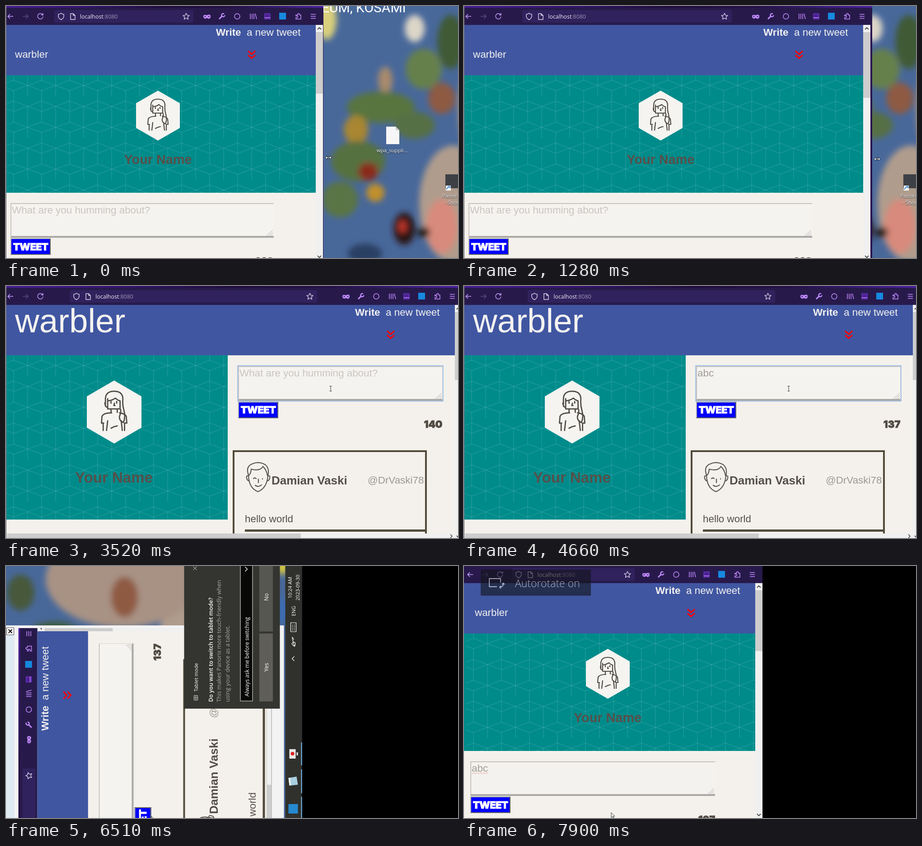
An HTML page that plays this animation: 1001 px wide and 560 px high, repeating every 8 s.

```html
<!DOCTYPE html>
<html lang="en">
<head>
<meta charset="utf-8">
<title>Window resize and autorotate</title>
<style>
html, body { margin: 0; width: 100%; height: 100%; overflow: hidden; background: #000; }
#stage { position: relative; width: 1001px; height: 560px; overflow: hidden; background: #000;
  font: 22.4px/0 "Liberation Sans", Arial, sans-serif; white-space: nowrap; color: #544e47; }
#stage div, #stage span, #stage svg, #stage i { position: absolute; }
#stage b { font-weight: 700; }
#view { inset: 0; overflow: hidden; }
#screen { left: 0; top: 0; width: 1001px; height: 560px; transform-origin: 0 0; }
svg { left: 0; top: 0; overflow: visible; }
.ui { font-family: "Open Sans", "Noto Sans", sans-serif; }
.heavy { font: 900 22px/0 Inter, sans-serif; -webkit-text-stroke: .8px; }

/* browser window */
#win { left: 0; top: 0; width: calc(var(--t) * 1px + 17px); max-width: 1005px; height: 564px; background: #2a1550; clip-path: inset(-36px 0 0 -6px); }
#strip { left: -5px; top: -36px; right: 0; height: 40px; background: linear-gradient(90deg, #471d93, #351370 24%, #1e0c3c 50%, #251048 72%, #4b229f); }
#bar { left: 0; top: 4px; right: 0; height: 38px; background: #271a4b; box-shadow: -5px 0 #271a4b; }
#url { left: calc(var(--t) * .112px + 30px); top: 5px; width: calc(var(--t) * .778px - 226px); height: 28px; border-radius: 4px; background: #30225c; }
#address { left: 57px; top: 14.5px; font-size: 12.4px; color: #f1edfa; }
#stage #address span { position: static; color: #9c93b4; }
#star { left: auto; right: 8px; top: 6px; }
#tools { left: calc(var(--t) * 1px - 256px); }
#page { left: 0; top: 42px; width: calc(var(--w) * 1px); height: 522px; background: #f4f1ec; box-shadow: -5px 0 #f4f1ec; }
#head { left: 0; top: 0; width: 100%; height: 112px; background: #4056a1; box-shadow: -5px 0 #4056a1; color: #f4f2f0; }
#logo { left: 20px; top: 66.2px; }
#write { left: calc(100% - 221px); top: 17.2px; white-space: pre; }
#chev { left: calc(100% - 150px); top: 56px; }
#hero { left: 0; top: 112px; width: 100%; height: 261px; background: #008b8b; box-shadow: -5px 0 #008b8b; }
#hex { left: calc(50% - 55px); top: 34px; width: 97px; height: 111px; }
#you { left: 0; width: calc(100% - 13px); top: 187px; text-align: center; font-weight: 700; font-size: 28.8px; color: #57504a; }
#form { left: 9.5px; top: 395.5px; width: calc(var(--w) * .9px - 34px); height: 77px; }
#area { inset: 0; box-sizing: border-box; border: solid #c6c3bf; border-width: 2px 0 4px 2px; border-bottom-color: #aaa8a5; background: #f5f3f0; }
#hint, #typed { left: 3.5px; top: 16.2px; color: #c9c5c1; }
#typed { color: #a19d99; }
#stage #word { position: static; }
.spell #word { text-decoration: underline wavy #f08d88 1px; }
#caret { top: -13px; width: 1px; height: 26px; background: #222; }
#grip { left: auto; top: auto; right: 2px; bottom: 4px; }
#send { left: .5px; top: 78.5px; width: 89px; height: 37px; box-sizing: border-box; border: 2px solid #777; border-color: #aaa #666 #666 #aaa; background: #00f; color: #fff; }
#send span { left: 0; right: 0; top: 16.5px; text-align: center; letter-spacing: -.6px; }
.press #send { border-color: #445 #00f #00f #445; }
#count { right: 0; top: 129px; color: #504a42; }
#card { display: none; left: 502px; top: 323px; width: 430px; height: 190px; box-sizing: border-box; border: 5px solid #524a3b; border-width: 4px 4px 5px; }
#hbar { display: none; left: 0; top: 508px; width: 100%; height: 14px; background: #f0f0f0; }
#hbar i { left: 2px; top: 0; width: 651px; height: 10px; background: #cdcdcd; }
#hbar svg { left: auto; right: 5px; top: 2px; }
#vbar { left: calc(var(--w) * 1px); top: 42px; width: 16px; height: 522px; background: #f0f0f0; }
#vbar i { left: 0; top: 16px; width: 16px; height: calc(var(--w) * .045px + 106px); background: #cdcdcd; }
#edge { left: 0; top: 0; width: 1px; height: 560px; background: #77737c; }

.wide #logo { font-size: 74.5px; top: 36.2px; }
.wide #hero { width: 491px; height: 365px; }
.wide #hex { left: calc(50% - 67px); top: 56px; width: 121px; height: 140px; }
.wide #you { font-size: 33px; top: 271.6px; }
.wide #form { left: 513.5px; top: 136px; width: calc(var(--w) * 1px - 541px); }
.wide #area { border-right: 1px solid #d8d5d1; }
.wide #card, .wide #hbar { display: block; }
.focus #area { box-shadow: 0 0 0 2px #a8c6ea; }
.spell #area { background: #f8f7f5; }
.portrait #area { background: #f4f2ee; }
.portrait #win { transform: translate(4px, -4px); }
.portrait #edge { display: none; }
.portrait #view { width: 661px; right: auto; }

/* capture frame around the stage */
#frame { left: 0; top: 0; }
#frame div { background: #f3f3f4; }
#popup { left: 33px; top: 15px; width: 244px; height: 58px; background: #131418; color: #f3f3f3; }
#popup span { left: 76px; top: 30px; font-size: 23px; font-weight: 300; }
.portrait #popup { left: 37px; top: 8px; }
</style>
</head>
<body>
<div id="stage">
  <div id="view"><div id="screen">
    <svg id="desk" width="1001" height="560">
      <defs>
        <clipPath id="deskClip"><path d="M-40-41H1176V628H-40z"/></clipPath>
        <filter id="soft" x="-10%" y="-10%" width="120%" height="120%"><feGaussianBlur stdDeviation="7"/></filter>
      </defs>
      <g clip-path="url(#deskClip)">
        <path fill="#48689a" d="M-40-41H1176V628H-40z"/>
        <g id="blobs" filter="url(#soft)"></g>
      </g>
      <text x="699" y="14" font-size="30" font-family="Roboto, sans-serif" fill="#fff">EUM, KOSAMI</text>
      <path d="M842 268h21l8 8v31h-29z" fill="#f6f6f6"/><path d="M863 268v8h8z" fill="#c9c9c9"/>
      <path d="M973 374h34v31h-34z" fill="#3d4145"/>
      <path d="M974 399h11v11h-11z" fill="#fff"/><path d="M976 408q0-5 5-5m-2-2h4v4" fill="none" stroke="#1d6fc0" stroke-width="1.6"/>
      <g class="ui" font-size="11.4" fill="#fff" style="text-shadow:0 1px 2px #000">
        <text x="855" y="325" text-anchor="middle">wpa_suppli...</text>
        <text x="966" y="426">Panorix</text><text x="971" y="441">- Shortcut</text>
      </g>
    </svg>

    <div id="win">
      <div id="strip"></div>
      <div id="bar">
        <svg width="90" height="38" fill="none" stroke="#c39cff" stroke-width="1.5">
          <path d="M16 19H4m5-5-5 5 5 5"/>
          <path d="M37 19h12m-5-5 5 5-5 5" stroke="#5d4a85"/>
          <path d="M81 15.500a6 6 0 1 0 1 4M82 12v4h-4"/>
        </svg>
        <div id="url">
          <svg width="50" height="28" fill="none" stroke="#ded6f0" stroke-width="1.4">
            <path d="M15 7q3 2.500 6 2.500v4q0 5-6 8-6-3-6-8v-4q3 0 6-2.500z"/><path d="M36 8h6l4 4v9H36zm6 0v4h4"/>
          </svg>
          <span id="address" class="ui">localhost<span>:8080</span></span>
          <svg id="star" width="16" height="16" fill="none" stroke="#ded6f0" stroke-width="1.300" stroke-linejoin="round"><path d="m8 1 2.100 4.600 5 .5-3.800 3.400 1.100 5L8 12l-4.400 2.500 1.100-5L.9 6.100l5-.5z"/></svg>
        </div>
        <svg id="tools" width="260" height="38" fill="none" stroke="#c48bff" stroke-width="1.500">
          <path d="M15 16.500q8-3.500 8 2.500t-5 5q-2 0-3-2-1 2-3 2-5 0-5-5t8-2.500z" fill="#c48bff" stroke="none"/>
          <path d="M9.500 19.500h3m5 0h3" stroke="#271a4b" stroke-width="2"/>
          <path d="m42 25 7-7" stroke-width="3"/><path d="M53 13.500a3.500 3.500 0 1 0 1.500 3" stroke-width="2.400"/>
          <circle cx="82" cy="19" r="6"/>
          <path d="M111 13v12m4-12v12m4-12v12m3-12 3 12"/>
          <path d="M143 13h12v12h-12z" fill="#4b2291" stroke="#6b33c0"/><path d="M143 22h12"/>
          <path d="M175 11h15v15h-15z" fill="#1689e0" stroke="none"/>
          <path d="M212 16h4v-1.500a2 2 0 0 1 4 0V16h3v9h-11v-3h2a2 2 0 0 0 0-4h-2z"/>
          <path d="M245 14.500h11m-11 4.500h11m-11 4.500h11"/>
        </svg>
      </div>
      <div id="page">
        <div id="head">
          <span id="logo">warbler</span>
          <span id="write"><b>Write</b>  a new tweet</span>
          <svg id="chev" width="16" height="20" fill="none" stroke="#f00" stroke-width="3"><path d="m0 2 8 7 8-7M0 11l8 7 8-7"/></svg>
        </div>
        <div id="hero">
          <svg width="100%" height="100%" style="overflow:hidden">
            <pattern id="cubes" width="62" height="93" x="-14" y="-12" patternUnits="userSpaceOnUse">
              <path fill="none" stroke="#fff" stroke-opacity=".17" d="M0 34.500 31 46l31-11.500M0 34.500 31 23l31 11.500M0 81l31-11.500L62 81M0-12l31 11.500L62-12M0 81l31 11.500L62 81M31 46v47M31 0v23M0 0v58m0 23v12M62 0v58m0 23v12"/>
            </pattern>
            <rect width="100%" height="100%" fill="url(#cubes)"/>
          </svg>
          <svg id="hex" viewBox="0 0 97 111" preserveAspectRatio="none">
            <path fill="#f5f4f1" d="M48.500 0 97 28v55l-48.500 28L0 83V28z"/>
            <g fill="none" stroke="#4f4a43" stroke-width="2.200" stroke-linejoin="round" stroke-linecap="round">
              <path d="M36 47q-4-1-3-5V33q0-14 15.500-14T64 33q-1 10 2 20 3 12-1 21-8-3-7-11 3-6 2-12M37 32v18h22V36q-6-2-8-5-6 4-14 5M43 51v5m11-5v5M33 38q-2 2 0 5"/>
              <path d="M43 37v3m10-3v3m-4 0-1 4h2M44 57q-14 0-17 6l-1 12h4m-1 0v13m8-17-2 17M58 57q9 1 12 6l1 12h-4m0 0v13m-6-17 2 17M43 84q5-3 11-4"/>
            </g>
          </svg>
          <div id="you">Your Name</div>
        </div>
        <div id="form">
          <div id="area"></div>
          <span id="hint">What are you humming about?</span>
          <span id="typed"><span id="word"></span><i id="caret"></i></span>
          <svg id="grip" width="14" height="14" fill="none" stroke="#aaa"><path d="M0 14 14 1M5 14l9-8M10 14l4-3.500"/></svg>
          <div id="send"><span class="heavy">TWEET</span></div>
          <span id="count" class="heavy"></span>
        </div>
        <div id="card">
          <svg width="54" height="67" style="left:25px;top:22px" fill="none" stroke="#5a5650" stroke-width="2.200" stroke-linecap="round">
            <path d="M6 29Q-1 10 15 4q14-6 28 2 10 8 6 25M6 28q0 30 21 38 20-8 22-36M8 29q4-7 4-13 20 5 26-6 8 8 10 20M6 31q-6-1-4 5 1 6 6 6m41-11q6-1 4 5-1 6-6 6M17 37q3-3 6 0m14 0v1m-9 0v8m-7 6q7 5 14-1"/>
          </svg>
          <span style="left:82px;top:63px;font-size:26px"><b>Damian Vaski</b></span>
          <span style="left:295px;top:63.2px;color:#9d9891">@DrVaski78</span>
          <span style="left:23px;top:149px">hello world</span>
          <i style="left:23px;right:0;top:172px;height:5px;background:#524a3b"></i>
        </div>
        <div id="hbar"><i></i><svg width="6" height="8" fill="none" stroke="#444" stroke-width="1.600"><path d="m1 0 4 4-4 4"/></svg></div>
      </div>
      <div id="vbar"><i></i><svg width="16" height="522" fill="none" stroke="#444" stroke-width="1.800"><path d="m4 10 4-4 4 4M4 513l4 4 4-4"/></svg></div>
      <div id="edge"></div>
    </div>

    <div id="frame">
      <div style="left:-6px;top:-32px;width:1012px;height:32px"></div>
      <div style="left:-6px;top:-27px;width:1008px;height:18px;background:#dfeaf3"></div>
      <div style="left:1001px;top:-32px;width:6px;height:619px"></div>
      <div style="left:-6px;top:560px;width:1013px;height:27px;border-top:1px solid #999"></div>
      <svg width="20" height="20" style="left:985px;top:-27px"><path d="M1 1h16v16H1z" fill="#fff" stroke="#444"/><path d="m5 5 8 8m0-8-8 8" stroke="#000" stroke-width="2"/></svg>
    </div>

    <svg id="shell" class="ui" width="1001" height="560" font-size="12" fill="#fff">
      <path d="M-40 591H1176V628H-40z" fill="#30312d"/>
      <g font-size="11" text-anchor="middle">
        <text x="1091" y="605">10:24 AM</text><text x="1091" y="622">2023-09-30</text><text x="1039" y="613">ENG</text>
      </g>
      <path d="M520 626h106v2H520zm114 0h53v2h-53zm62 0h51v2h-51z" fill="#76b9ed"/>
      <path d="M589 598h21v21h-21z" fill="#2489d0"/>
      <path d="m651 600 17-2 3 18-18 3z" fill="#a9cfe0"/><path d="m651 600 17-2 .5 4-17 2z" fill="#e9f3f7"/>
      <path d="M711 600h21v14h-21zm7 16h7v3h-7z" fill="#e9e9e9"/><circle cx="722" cy="607" r="4" fill="#e02020"/>
      <g fill="none" stroke="#fff" stroke-width="1.200">
        <path d="m928 611 5-5 5 5M960 612q6-10 9-4t-5 5 8-5 3 2"/>
        <path d="M993 603h20v12h-20z"/><path d="M996 607h14m-14 4h14" stroke-dasharray="2 1.500"/>
      </g>
      <path d="M1142 601h15v12h-8l-4 4v-4h-3z"/><circle cx="1155" cy="614" r="6.500" fill="#30312d" stroke="#fff"/><text x="1152" y="618" font-size="10">3</text>
      <g id="dialog">
        <path d="M822 367h339v212H822z" fill="#343530"/>
        <path d="M841 389h10v8h-10zm0 4h10m-5-4v8m284-10 8 8m0-8-8 8" fill="none" stroke="#ddd"/>
        <text x="860" y="397" font-size="11">Tablet mode</text>
        <text x="837" y="430.500" font-size="12.500" font-weight="600">Do you want to switch to tablet mode?</text>
        <g font-size="12.700" fill="#a9a9a5"><text x="837" y="448.500">This makes Panorix more touch-friendly when</text><text x="837" y="467.500">using your device as a tablet.</text></g>
        <path d="M839 491.500h306v27H839z" fill="#080807" stroke="#8c8c86" stroke-width="2"/>
        <text x="849" y="510">Always ask me before switching</text>
        <path d="m1127 502 5 5 5-5" fill="none" stroke="#fff" stroke-width="1.300"/>
        <path d="M838 533.500h151v30H838z" fill="#5f5e58"/><path d="M993.500 533.500H1146v30H993.500z" fill="#565751"/>
        <g text-anchor="middle" font-size="12.500"><text x="914" y="553">Yes</text><text x="1070" y="553">No</text></g>
      </g>
    </svg>
  </div></div>

  <div id="popup" class="ui">
    <svg width="60" height="58" fill="none" stroke="#f3f3f3" stroke-width="1.800"><path d="M36 38H19V20h25v9M50 30q1 9-8 9m3-3-3 3 3 3m2-9 3-3 3 3"/></svg>
    <span>Autorotate on</span>
  </div>
  <svg id="cursor" width="1" height="1">
    <g id="arrow"><path d="M0 0v11l2.600-2.400 1.700 3.600 1.600-.8-1.600-3.400H8z" fill="#fff" stroke="#000" stroke-width=".8"/></g>
    <g id="beam"><path d="M-2.500-5.500h5m-2.500 0v11m-2.500 0h5" fill="none" stroke="#333"/></g>
    <g id="size"><path d="m-7 0 4-3.500V-1h6v-2.500L7 0 3 3.500V1h-6v2.500z" fill="#fff" stroke="#000" stroke-width=".8"/></g>
  </svg>
</div>

<script>
const $ = id => document.getElementById(id);

// soft wallpaper tones: x, y, rx, ry, colour
const blobs = [
  [710, 30, 22, 45, '#d9cf7c'], [905, 50, 22, 30, '#dcd5c8'], [985, 80, 30, 60, '#3f5a35'],
  [925, 140, 40, 45, '#66804c'], [840, 165, 16, 30, '#a98a6c'], [830, 225, 75, 35, '#58753f'],
  [775, 275, 27, 32, '#a88632'], [780, 345, 60, 45, '#57713f'], [802, 368, 22, 20, '#8a2a1d'],
  [818, 415, 20, 20, '#c1902c'], [740, 430, 40, 40, '#5a7445'], [965, 205, 30, 35, '#8e5a42'],
  [905, 265, 45, 30, '#566f45'], [990, 440, 75, 130, '#b09c8c'], [965, 490, 35, 60, '#d88a7c'],
  [882, 495, 24, 36, '#2a1715'], [878, 490, 9, 14, '#c0392c'], [925, 503, 14, 12, '#241b18'],
  [795, 550, 38, 22, '#2c3f63'], [1110, 230, 108, 170, '#a89284'], [1080, 5, 40, 30, '#46593b'],
  [1070, 235, 45, 30, '#8f5a42'], [1140, 585, 20, 14, '#d8c83a'], [1040, 585, 30, 10, '#3b6db8']
];
$('blobs').innerHTML = blobs.map(([x, y, rx, ry, c]) =>
  `<ellipse cx="${x}" cy="${y}" rx="${rx}" ry="${ry}" fill="${c}"/>`).join('');

const smooth = p => p * p * (3 - 2 * p);
const drag = (time, w) => [time, { w, t: w + 3, x: w + 31, y: 340 }];
const move = (time, x, y, cursor, more) => [time, { x, y, cursor, ...more }];
const turn = time => {
  const p = (time - 6510) / 610;
  return [time, {
    mode: 'wide', popup: 0, dialog: time > 6300, cursor: 'arrow',
    x: time < 6600 ? 322 : 326, y: time < 6600 ? 556 : 548,
    place: `translate(${27.5 + 24.8 * p}px, ${1139 - 49 * p}px) rotate(-90deg) scale(${1 - .067 * p})`
  }];
};

// each entry changes the state from its time on
const events = [
  [0, { w: 686, t: 686, x: 714, y: 337, cursor: 'size', mode: '', text: '', caret: 0, popup: 0, dialog: false, place: 'none' }],
  ...Array.from({ length: 8 }, (_, k) => drag(150 + Math.round(k * 1000 / 7), Math.round(686 + 174 * smooth((k + 1) / 8)))),
  drag(1280, 884), drag(1420, 910), drag(1560, 936),
  [1700, { w: 960, t: 960, x: 988, mode: 'wide' }],
  [1840, { w: 980, t: 980, x: 1010 }],
  [1980, { w: 994, t: 994, x: 1030 }],
  move(2400, 925, 318, 'arrow'), move(2570, 850, 278, 'arrow'), move(2750, 765, 240, 'beam'),
  move(2920, 719, 228, 'beam', { mode: 'wide focus' }),
  [3090, { caret: 1 }], [3520, { caret: 0 }],
  [4120, { text: 'ab', caret: 1 }], [4380, { text: 'abc' }], [4660, { caret: 0 }],
  [4940, { caret: 1 }],
  move(5070, 690, 236, 'beam'), move(5200, 624, 264, 'arrow'), move(5340, 573, 283, 'arrow'),
  [5780, { mode: 'wide spell press', caret: 0, popup: 1 }],
  [5920, { mode: 'wide spell' }],
  ...[6230, 6370, 6510, 6690, 6830, 6980, 7120].map(turn),
  [7750, { mode: 'portrait spell', w: 641, t: 640, place: 'none', dialog: false, popup: .9 }],
  [7900, { popup: .6 }]
];

const stage = $('stage');
let shown = -1;

function draw() {
  const now = performance.now() % 8000;
  const count = events.filter(e => e[0] <= now).length;
  if (count !== shown) {
    shown = count;
    const s = Object.assign({}, ...events.slice(0, count).map(e => e[1]));
    stage.className = s.mode;
    stage.style.setProperty('--w', s.w);
    stage.style.setProperty('--t', s.t);
    $('screen').style.transform = s.place;
    $('word').textContent = s.text;
    $('hint').style.opacity = s.text ? 0 : 1;
    $('count').textContent = 140 - s.text.length;
    $('caret').style.opacity = s.caret;
    $('popup').style.opacity = s.popup;
    $('dialog').style.display = s.dialog ? 'inline' : 'none';
    $('cursor').style.transform = `translate(${s.x}px, ${s.y}px)`;
    for (const id of ['arrow', 'beam', 'size']) $(id).style.display = id === s.cursor ? 'inline' : 'none';
  }
  requestAnimationFrame(draw);
}
draw();
</script>
</body>
</html>
```
